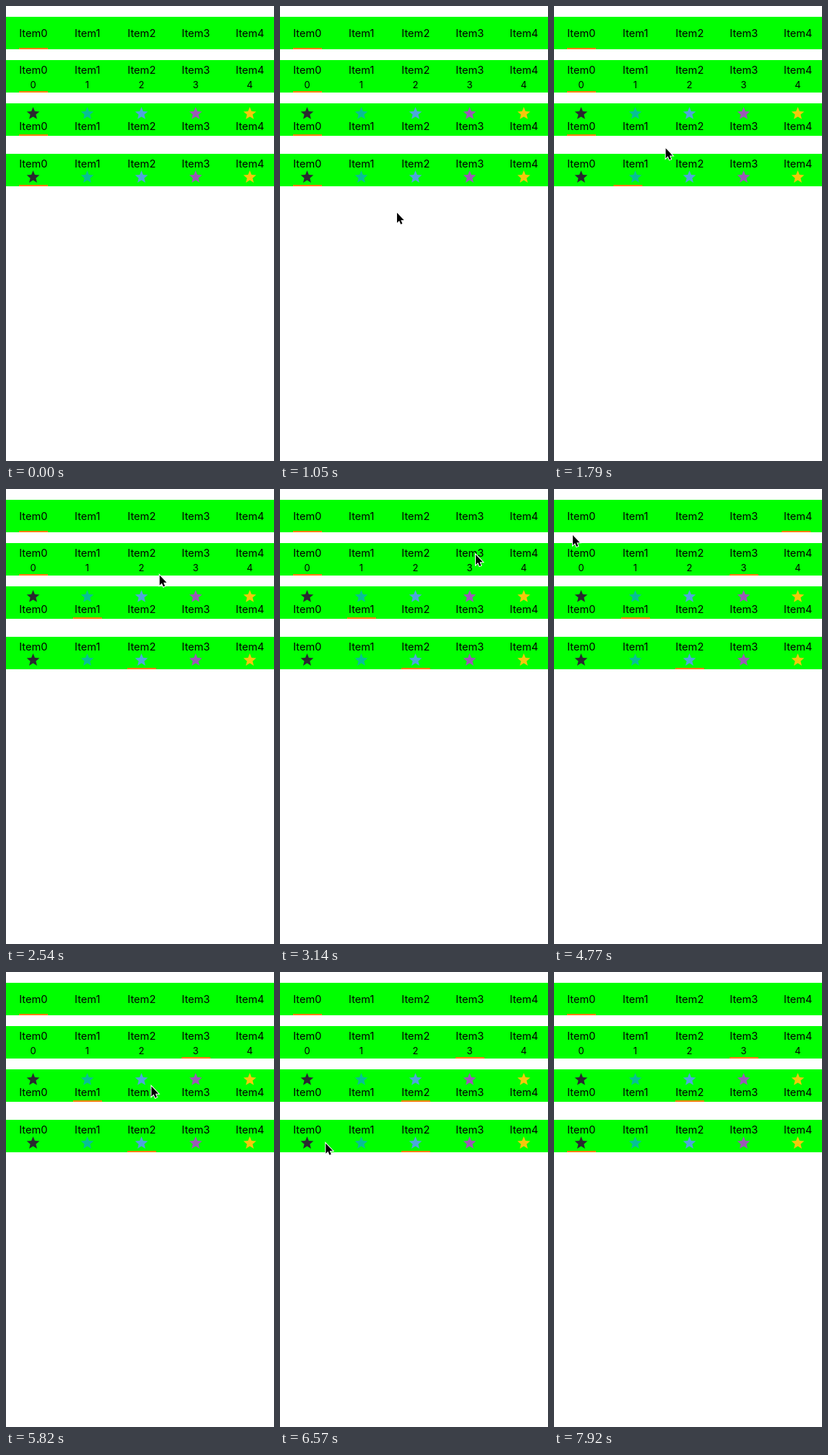
These frames come from a looping animation (371x631 px, 8520 ms). An HTML page with a canvas:

```html
<!DOCTYPE html>
<html lang="en">
<head>
<meta charset="utf-8">
<title>Tab bars</title>
<style>
  html, body { margin: 0; width: 100%; height: 100%; overflow: hidden; background: #fff; }
  canvas { display: block; width: 371px; height: 631px; }
</style>
</head>
<body>
<canvas id="stage"></canvas>
<script>
const W = 371, H = 631, LOOP = 8520;
const TICK = 149.4, LEAD = 12;   // the screen refreshes in coarse ticks
const PITCH = 75, BAR_HEIGHT = 45, SLIDE = 300;
const TRAVEL = 0.75;             // share of each gap spent moving, the rest is a pause
const STAR_COLORS = ['#29292f', '#08be97', '#4ea6dc', '#9b59b6', '#f4c80c'];

const bars = [
  { y: 15, label: 28.2 },
  { y: 75, label: 19.2, digit: 39 },
  { y: 135, label: 37.2, star: 14.3 },
  { y: 205, label: 19.2, star: 32.4 }
];

// Pointer stops; a stop that lies on a bar selects the item under it.
const stops = [
  { time: 448, x: 170, y: 374 },
  { time: 620, x: 126, y: 377 },
  { time: 780, x: 126, y: 377 },
  { time: 1657, x: 185, y: 223 },
  { time: 2250, x: 117, y: 165 },
  { time: 3160, x: 270, y: 90 },
  { time: 4498, x: 347, y: 43 },
  { time: 4781, x: 25, y: 63 },
  { time: 5080, x: 19, y: 41 },
  { time: 6130, x: 201, y: 158 },
  { time: 6750, x: 62, y: 237 },
  { time: 7100, x: 58, y: 257 },
  { time: 7800, x: 268, y: 564 }
];

const canvas = document.getElementById('stage');
const ctx = canvas.getContext('2d');
const ratio = window.devicePixelRatio || 1;
canvas.width = W * ratio;
canvas.height = H * ratio;

const lerp = (a, b, p) => a + (b - a) * p;
const clamp = p => Math.min(1, Math.max(0, p));
const easeInOut = p => p * p * (3 - 2 * p);
const easeOut = p => Math.sin(p * Math.PI / 2);
const center = i => PITCH * (i + 0.5);
const itemAt = x => Math.round(x / PITCH - 0.5);

for (const bar of bars) {
  bar.taps = stops.filter(s => s.y >= bar.y && s.y < bar.y + BAR_HEIGHT);
}

function selection(bar, time) {
  return bar.taps.reduce((pos, tap) =>
    lerp(pos, itemAt(tap.x), easeInOut(clamp((time - tap.time) / SLIDE))), 0);
}

function pointerAt(time) {
  const next = stops.findIndex(s => s.time > time);
  if (next < 1) return null;
  const a = stops[next - 1], b = stops[next];
  const p = easeOut(clamp((time - a.time) / (b.time - a.time) / TRAVEL));
  return { x: lerp(a.x, b.x, p), y: lerp(a.y, b.y, p) };
}

function drawText(text, x, y, size) {
  ctx.font = `${size}px Inter, sans-serif`;
  ctx.fillStyle = '#000';
  ctx.fillText(text, x, y);
}

function drawStar(x, y, color) {
  ctx.beginPath();
  for (let i = 0; i < 10; i++) {
    const r = i % 2 ? 4.1 : 9.3;
    const a = i * Math.PI / 5 - Math.PI / 2;
    ctx.lineTo(x + r * Math.cos(a), y + r * Math.sin(a));
  }
  ctx.closePath();
  ctx.fillStyle = color;
  ctx.fill();
}

function drawBar(bar, time) {
  ctx.fillStyle = '#00ff00';
  ctx.fillRect(0, bar.y, W, BAR_HEIGHT);
  STAR_COLORS.forEach((color, i) => {
    const x = center(i);
    drawText('Item' + i, x + 0.3, bar.y + bar.label, 14.6);
    if (bar.digit) drawText(i, x, bar.y + bar.digit, 13);
    if (bar.star) drawStar(x, bar.y + bar.star, color);
  });
  ctx.fillStyle = '#ff8000';
  ctx.fillRect(18 + PITCH * selection(bar, time), bar.y + 43, 40, 2);
}

const arrow = new Path2D('M0 0V14L3.1 11L5.2 16L7.4 15L5.4 10.2H9.7Z');

function drawPointer({ x, y }) {
  ctx.save();
  ctx.translate(x + 1, y + 1);
  ctx.lineWidth = 2;
  ctx.strokeStyle = '#fff';
  ctx.stroke(arrow);
  ctx.fillStyle = '#000';
  ctx.fill(arrow);
  ctx.restore();
}

function draw(now) {
  const time = Math.floor((now % LOOP + LEAD) / TICK) * TICK;
  ctx.setTransform(ratio, 0, 0, ratio, 0, 0);
  ctx.fillStyle = '#fff';
  ctx.fillRect(0, 0, W, H);
  ctx.textAlign = 'center';
  bars.forEach(bar => drawBar(bar, time));
  const pointer = pointerAt(time);
  if (pointer) drawPointer(pointer);
  requestAnimationFrame(() => draw(performance.now() - origin));
}

const origin = performance.now();
draw(0);
</script>
</body>
</html>
```
